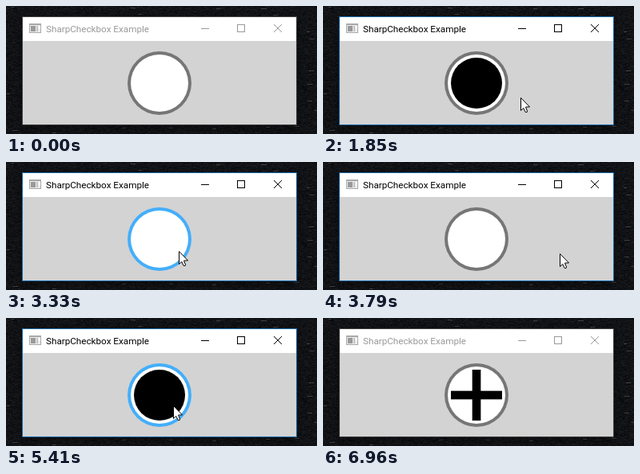
Write an HTML page with a canvas that moves like this. It is 389 by 161 pixels and loops after 7040 ms.

```html
<!DOCTYPE html>
<html lang="en">
<head>
<meta charset="utf-8">
<title>Checkbox demo</title>
<style>
  html, body { margin: 0; width: 100%; height: 100%; overflow: hidden; background: #101113; }
  canvas { position: absolute; left: 0; top: 0; width: 389px; height: 161px; }
  #title {
    position: absolute; left: 50px; top: 14px; line-height: 30px; white-space: nowrap;
    font-family: Roboto, "Open Sans", sans-serif; font-size: 11.7px; color: #999;
  }
</style>
</head>
<body>
<canvas id="stage" width="389" height="161"></canvas>
<div id="title">SharpCheckbox Example</div>
<script>
const W = 389, H = 161, LOOP = 7040, STEP = 75;
const CX = 192, CY = 97, MARK = 32;
const ctx = document.getElementById('stage').getContext('2d');
const title = document.getElementById('title');

const states = ['none', 'dot', 'plus'];
const clicks = [1220, 2240, 3330, 4400, 5640];

// Each move starts where the last one ended.
const move = (at, dur, x, y) => ({ at, dur, x, y });
const moves = [
  move(0, 0, 232, 161),
  move(610, 450, 204, 116),
  move(1540, 80, 279, 115),
  move(1770, 150, 206, 114),
  move(2470, 80, 272, 115),
  move(2700, 160, 216, 112),
  move(3560, 80, 301, 115),
  move(3790, 230, 220, 111),
  move(4630, 0, 190, 111),
  move(4800, 230, 281, 114),
  move(5260, 150, 209, 110),
  move(5640, 180, 254, 182)
];

// The pointer gathers speed along each move, seen in steps of about 75 ms.
function pointerAt(t) {
  const i = moves.filter(m => m.at <= t).length - 1;
  const to = moves[i], from = moves[Math.max(0, i - 1)];
  const gaps = Math.round(to.dur / STEP);
  const done = to.dur ? Math.min(1, (t - to.at) / to.dur) : 1;
  const k = ((Math.floor(done * gaps) + 1) / (gaps + 1)) ** 2;
  return [
    Math.round(from.x + (to.x - from.x) * k),
    Math.round(from.y + (to.y - from.y) * k)
  ];
}

function random(seed) {
  return () => (seed = (seed * 16807) % 2147483647) / 2147483647;
}

function makeBackdrop() {
  const c = document.createElement('canvas');
  c.width = W;
  c.height = H;
  const g = c.getContext('2d');
  const img = g.createImageData(W, H);
  const rnd = random(4711);
  let grain = 0;
  for (let i = 0; i < W * H; i++) {
    grain = grain * 0.4 + (rnd() - 0.5) * 16;
    const v = 18 + grain;
    img.data.set([v, v + 1, v + 4, 255], i * 4);
  }
  g.putImageData(img, 0, 0);
  g.fillStyle = 'rgba(190,195,200,0.25)';
  for (let i = 0; i < 90; i++) g.fillRect(rnd() * W | 0, rnd() * H | 0, 3 + rnd() * 5 | 0, 1);
  g.shadowColor = 'rgba(0,0,0,0.5)';
  g.shadowBlur = 14;
  g.shadowOffsetY = 4;
  g.fillStyle = '#000';
  g.fillRect(21, 14, 342, 135);
  return c;
}
const backdrop = makeBackdrop();

function box(color, x, y, w, h) {
  ctx.fillStyle = color;
  ctx.fillRect(x, y, w, h);
}

function disc(color, r) {
  ctx.fillStyle = color;
  ctx.beginPath();
  ctx.arc(CX, CY, r, 0, Math.PI * 2);
  ctx.fill();
}

function drawIcon() {
  box('#a8a8a8', 29, 22, 15, 12);
  box('#ececec', 30, 24, 13, 9);
  box('#9a9a9a', 31, 25, 6, 7);
  box('#c4c4c4', 38, 25, 2, 7);
  box('#fff', 41, 25, 2, 4);
}

function drawWindow(active) {
  box(active ? '#1a6cae' : '#434343', 20, 13, 344, 137);
  box('#fff', 21, 14, 342, 30);
  box('#d3d3d3', 21, 44, 342, 105);
  drawIcon();
  const ink = active ? '#000' : '#999';
  title.style.color = ink;
  box(ink, 244, 28, 10, 1);
  box(ink, 289, 23, 10, 10);
  box('#fff', 290, 24, 8, 8);
  ctx.strokeStyle = ink;
  ctx.lineWidth = 1;
  ctx.beginPath();
  ctx.moveTo(335, 23);
  ctx.lineTo(345, 33);
  ctx.moveTo(345, 23);
  ctx.lineTo(335, 33);
  ctx.stroke();
}

function drawCheckbox(mark, hover) {
  disc(hover ? '#44aefa' : '#767676', 40);
  disc('#fff', 36);
  if (mark === 'dot') disc('#000', MARK);
  if (mark === 'plus') {
    const bar = MARK / 6;
    box('#000', CX - MARK, CY - bar, MARK * 2, bar * 2);
    box('#000', CX - bar, CY - MARK, bar * 2, MARK * 2);
  }
}

function drawPointer(x, y) {
  ctx.beginPath();
  for (const [dx, dy] of [[0, 0], [0, 16], [3.3, 13], [5.7, 18], [7.6, 18], [8, 16.5], [6, 11.6], [11, 11.4]])
    ctx.lineTo(x + dx + 0.5, y + dy + 0.5);
  ctx.closePath();
  ctx.fillStyle = '#fff';
  ctx.fill();
  ctx.strokeStyle = '#000';
  ctx.lineWidth = 1;
  ctx.lineJoin = 'round';
  ctx.stroke();
}

function draw(t) {
  const [x, y] = pointerAt(t);
  const count = clicks.filter(c => c <= t).length;
  ctx.drawImage(backdrop, 0, 0);
  drawWindow(t >= 1140 && t < 6960);
  drawCheckbox(states[count % states.length], Math.hypot(x - CX, y - CY) < 40);
  drawPointer(x, y);
}

const start = performance.now();
function tick() {
  draw((performance.now() - start) % LOOP);
  requestAnimationFrame(tick);
}
tick();
</script>
</body>
</html>
```
